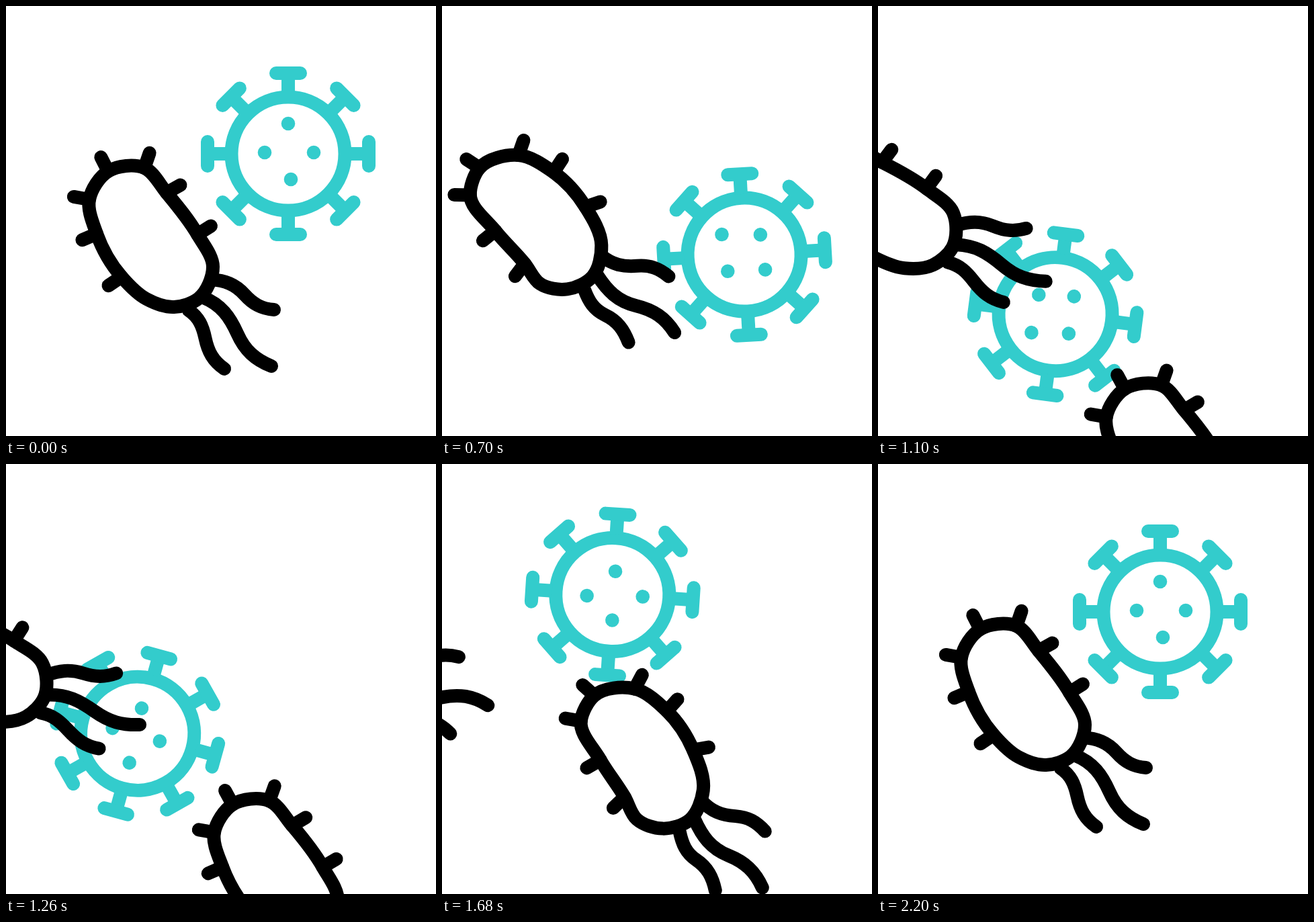
Write an HTML page with a canvas that moves like this. It is 640x640 px and loops after 2.4 s.

```html
<!DOCTYPE html>
<html lang="en">
<head>
<meta charset="utf-8">
<title>Microbes</title>
<style>
  html, body { margin: 0; width: 100%; height: 100%; overflow: hidden; background: #fff; }
  canvas { display: block; width: 640px; height: 640px; }
</style>
</head>
<body>
<canvas id="stage" width="640" height="640"></canvas>
<script>
const ctx = document.getElementById('stage').getContext('2d');
const LOOP = 2400, STEP = 20, START = 200, MOVE = 2000;
const TEAL = '#33cccc', RAD = Math.PI / 180, SPIKE = 23.5;
const CENTRE = [215, 343];

// Bézier paths of the three movers
const orbit = [[420, 220], [587, 390], [292, 564], [197, 614], [-25, 224], [263, 94], [420, 220]];
const leave = [[215, 343], [53, 291], [-108, 293], [-270, 303]];
const enter = [[473, 813], [479, 766], [393, 523], [215, 343]];

// Outline points: x, y, shift when bent, then spike direction and its swing
const outline = [
  [172, 403, 18, -2, 146, -10],
  [135, 339, 19, 7, 157, -7],
  [124, 288, 1, 0, 190, 0],
  [152, 246, -7, 4, 243, -21],
  [206, 241, -1, -1, -71, 9],
  [239, 278, 14, -5, -29, -19],
  [285, 340, 7, -9, -32, 22],
  [308, 388, -1, 3],
  [287, 435, 0, 0],
  [250, 448, -3, 0],
  [209, 436, -1, -2]
];
const tails = [
  { from: [305, 407], mid: [355, 429.5], to: [399, 452], heading: 26 },
  { from: [294, 434], mid: [344.5, 488], to: [395, 536], heading: 44 },
  { from: [272, 453], mid: [296.5, 494.5], to: [325, 540], heading: 56 }
];

const mix = (a, b, k) => a.map((v, i) => v + (b[i] - v) * k);
const smooth = u => u * u * (3 - 2 * u);
const polar = ([x, y], r, deg) => [x + r * Math.cos(deg * RAD), y + r * Math.sin(deg * RAD)];
const dist = (a, b) => Math.hypot(b[0] - a[0], b[1] - a[1]);

// Point on a Bézier path of any degree
function along(pts, k) {
  while (pts.length > 1) pts = pts.slice(1).map((p, i) => mix(pts[i], p, k));
  return pts[0];
}

// Cubic easing with handles (a, 0) and (b, 1)
function ease(u, a, b) {
  let lo = 0, hi = 1;
  for (let i = 0; i < 30; i++) {
    const s = (lo + hi) / 2;
    const x = 3 * a * s * (1 - s) ** 2 + 3 * b * s * s * (1 - s) + s ** 3;
    if (x < u) lo = s; else hi = s;
  }
  return smooth((lo + hi) / 2);
}

function line(a, b, cap) {
  ctx.lineCap = cap;
  ctx.beginPath();
  ctx.moveTo(...a);
  ctx.lineTo(...b);
  ctx.stroke();
}

function disc(x, y, r) {
  ctx.beginPath();
  ctx.arc(x, y, r, 0, 2 * Math.PI);
}

// Closed smooth curve, tangents weighted by the distance between points
function loop(pts) {
  const n = pts.length, at = i => pts[(i + n) % n];
  const handle = (i, len) => {
    const [a, p, b] = [at(i - 1), at(i), at(i + 1)];
    const d0 = dist(a, p), d1 = dist(p, b);
    return p.map((v, k) => v + len / 3 *
      ((b[k] - v) / d1 * d0 + (v - a[k]) / d0 * d1) / (d0 + d1));
  };
  ctx.beginPath();
  ctx.moveTo(...pts[0]);
  for (let i = 0; i < n; i++) {
    const d = dist(at(i), at(i + 1));
    ctx.bezierCurveTo(...handle(i, d), ...handle(i + 1, -d), ...at(i + 1));
  }
  ctx.closePath();
  ctx.stroke();
}

function drawVirus([x, y], angle) {
  ctx.save();
  ctx.translate(x, y);
  ctx.rotate(angle * RAD);
  ctx.strokeStyle = ctx.fillStyle = TEAL;
  disc(0, 0, 84.5);
  ctx.stroke();
  for (let i = 0; i < 8; i++) {
    line([0, -90], [0, -120], 'butt');
    line([-18, -120], [18, -120], 'round');
    ctx.rotate(Math.PI / 4);
  }
  for (const [dx, dy] of [[0, -45], [-35, -2], [38, -2], [4, 38]]) {
    disc(dx, dy, 10.3);
    ctx.fill();
  }
  ctx.restore();
}

// The wave swings about the heading, its middle against its ends
function drawTail({ from, mid, to, heading }, bend) {
  const swing = 22 * (2 * bend - 1);
  const r1 = 0.38 * dist(from, mid), r2 = 0.38 * dist(mid, to);
  ctx.beginPath();
  ctx.moveTo(...from);
  ctx.bezierCurveTo(...polar(from, r1, heading + swing), ...polar(mid, -r1, heading - swing), ...mid);
  ctx.bezierCurveTo(...polar(mid, r2, heading - swing), ...polar(to, -r2, heading + swing), ...to);
  ctx.stroke();
}

function drawBacterium([x, y], angle, bend) {
  ctx.save();
  ctx.translate(x, y);
  ctx.rotate(angle * RAD);
  ctx.translate(-CENTRE[0], -CENTRE[1]);
  ctx.strokeStyle = '#000';
  ctx.lineCap = 'round';
  for (const tail of tails) drawTail(tail, bend);
  const pts = outline.map(([px, py, dx, dy]) => [px + dx * bend, py + dy * bend]);
  loop(pts);
  outline.forEach(([, , , , dir, swing], i) => {
    if (dir !== undefined) line(pts[i], polar(pts[i], SPIKE, dir + swing * bend), 'round');
  });
  ctx.restore();
}

function draw(t) {
  ctx.fillStyle = '#fff';
  ctx.fillRect(0, 0, 640, 640);
  ctx.lineWidth = 20;
  ctx.lineJoin = 'round';

  const u = Math.min(Math.max((t - START) / MOVE, 0), 1), k = smooth(u);
  // Two bends over and back, slightly early in the second half
  const phase = (4 * u + 0.05 * Math.sin(Math.PI * u) ** 2) % 2;
  const bend = smooth(phase < 1 ? phase : 2 - phase);

  drawVirus(along(orbit, k), -360 * ease(u, 1 / 3, 5 / 6));
  if (u < 1) drawBacterium(along(leave, k), -36 * ease(u, 1 / 3, 1 / 3), bend);
  drawBacterium(along(enter, k), 0, bend);
}

function tick() {
  const t = performance.now() % LOOP;
  draw(Math.floor(t / STEP) * STEP);
  requestAnimationFrame(tick);
}
tick();
</script>
</body>
</html>
```
